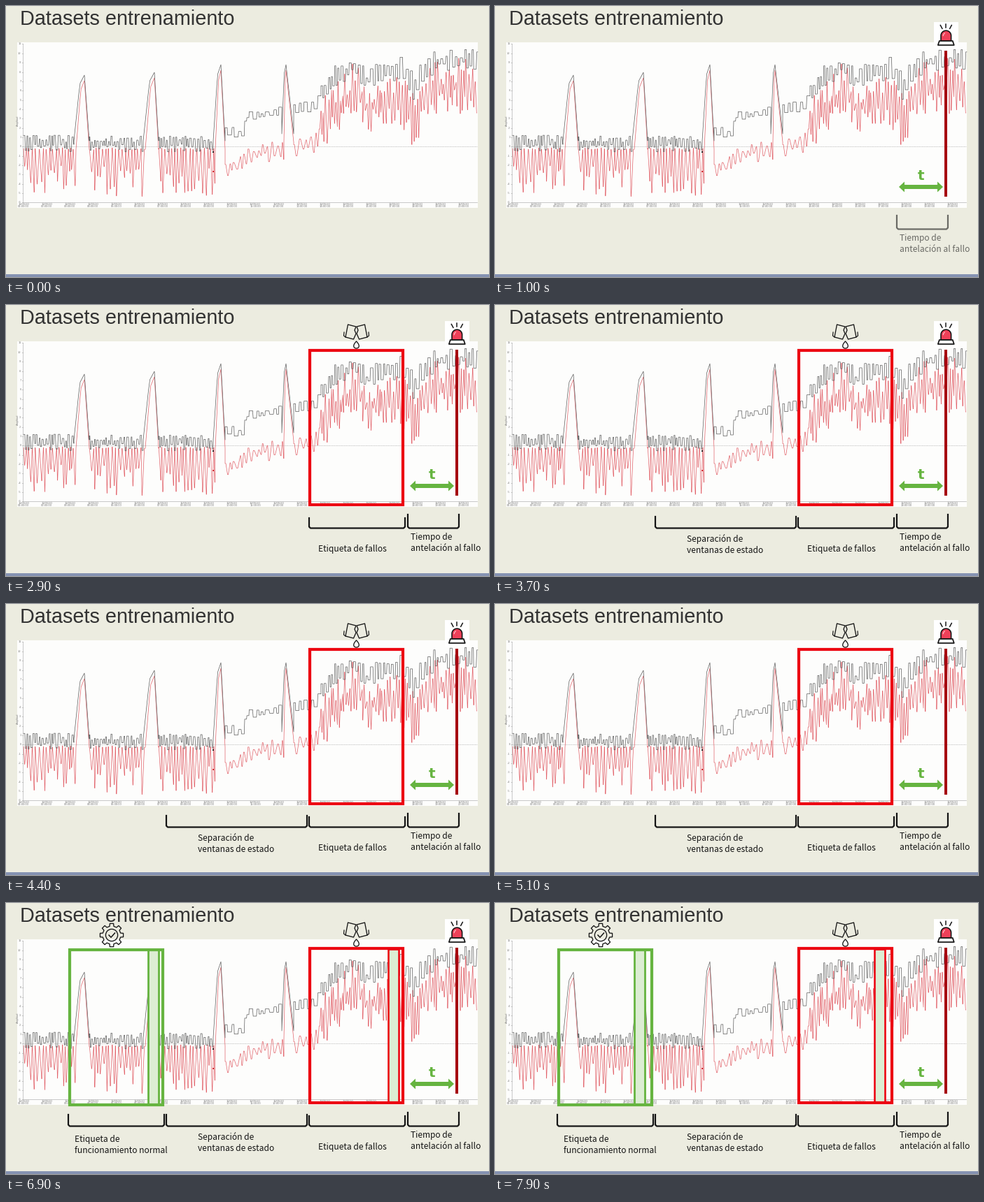
A matplotlib script that plays this animation: 690x388 px, repeating every 8 s.

```python
import numpy as np
import matplotlib.pyplot as plt
from matplotlib.animation import FuncAnimation
from matplotlib.patches import Circle, Polygon, Rectangle
from matplotlib.transforms import Bbox, TransformedBbox

W, H = 690, 388
STEP, FRAMES = 100, 80
PX = 0.72  # points per pixel at 100 dpi

BG, INK = "#ecece0", "#141414"
RED, DARK_RED = "#ec0612", "#a60510"
GREEN, PALE = "#66b440", "#dcedd3"

fig = plt.figure(figsize=(W / 100, H / 100), dpi=100, facecolor=BG)
ax = fig.add_axes([0, 0, 1, 1])
ax.set_xlim(0, W)
ax.set_ylim(H, 0)
ax.axis("off")
rng = np.random.default_rng(11)


# drawing helpers, all in pixel coordinates

def line(pts, color=INK, width=2.0, z=5, **kw):
    x, y = zip(*pts)
    return ax.plot(x, y, color=color, lw=width * PX, zorder=z,
                   solid_joinstyle="round", **kw)[0]


def box(x0, y0, x1, y1, face="none", edge="none", width=0.0, z=5):
    return ax.add_patch(Rectangle((x0, y0), x1 - x0, y1 - y0, fc=face, ec=edge,
                                  lw=width * PX, zorder=z, joinstyle="miter"))


def shape(pts, face="none", edge=INK, width=1.3, z=6):
    return ax.add_patch(Polygon(pts, closed=True, fc=face, ec=edge,
                                lw=width * PX, zorder=z, joinstyle="round"))


def text(x, y, s, size=12, color=INK, font="Noto Sans CJK JP", **kw):
    kw.setdefault("va", "baseline")
    return ax.text(x, y, s, fontsize=size * PX, color=color, family=font,
                   clip_on=True, zorder=7, **kw)


def label(x, y, *rows):
    return [text(x, y + 15.5 * i, s) for i, s in enumerate(rows)]


def bracket(x0, x1, top, bottom=319.5):
    return [line([(x0, top), (x0, bottom - 2), (x0 + 2, bottom),
                  (x1 - 2, bottom), (x1, bottom - 2), (x1, top)], width=2.2)]


def polar(cx, cy, r, deg):
    a = np.radians(deg)
    return cx + r * np.cos(a), cy + r * np.sin(a)


# chart signals

ZERO, UNIT = 201.3, 13.35
LEFT, RIGHT = 25, 674
PEAKS = [(97, 112, 119, 99), (196, 212, 218, 95), (296, 307, 313, 84), (394, 400, 411, 84)]
IDLE_END = 313
KNOTS = [313, 336, 343, 392, 440, 460, 500, 515, 565, 584, 597, 630, 674]
BLACK_Y = [180, 187, 158, 153, 144, 110, 84, 108, 86, 124, 86, 78, 76]
RED_Y = [230, 222, 212, 206, 194, 160, 118, 146, 130, 172, 122, 116, 114]


def wander(x0, x1, gap, level, up, down, flat=0.0, least=0.1):
    """Alternate above and below a level, with flat tops of random width."""
    pts, x, side = [], x0, -1
    while x < x1:
        step = gap * rng.uniform(0.5, 1.5)
        y = level(x) + side * rng.uniform(least, 1) * (up if side < 0 else down)
        pts += [(x, y), (min(x + flat * step, x1), y)]
        x, side = x + step, -side
    return pts


def peak(x0, xt, x1, top, base):
    rise = [(x0 + f * (xt - x0), base + g * (top - base))
            for f, g in ((0, 0), (0.47, 0.72), (0.6, 0.88), (1, 1))]
    return rise + [(x1, base)]


def signal(idle, busy, base, lag, drop):
    """Quiet noise, then a rising trend, interrupted by the tall peaks."""
    pts, x = [], LEFT
    for x0, xt, x1, top in PEAKS:
        pts += (idle if x < IDLE_END else busy)(x, x0 + lag)
        foot = base if x1 <= IDLE_END else base - 10
        pts += peak(x0 + lag, xt, x1, top + drop, foot)
        x = x1
    return pts + busy(x, RIGHT)


def black_trend(x):
    return np.interp(x, KNOTS, BLACK_Y)


def red_trend(x):
    return np.interp(x, KNOTS, RED_Y)


def black_idle(x0, x1):
    return wander(x0, x1, 2.3, lambda x: 196, 11, 13, 0.7)


def black_busy(x0, x1):
    calm = wander(x0, min(x1, 450), 5, black_trend, 10, 6, 0.85)
    return calm + wander(max(x0, 450), x1, 3.2, black_trend, 19, 17, 0.8)


def red_idle(x0, x1):
    return wander(x0, x1, 2.35, lambda x: 207, 4, 70, 0.1, 0.3)


def red_busy(x0, x1):
    calm = wander(x0, min(x1, 450), 3.5, red_trend, 14, 16, 0.3)
    return calm + wander(max(x0, 450), x1, 1.9, red_trend, 42, 42, 0.1)


def draw_slide():
    box(0, 384, W, H, "#8592b2", z=1)
    text(20, 27, "Datasets entrenamiento", 28.85, "#333333", "Liberation Sans")
    box(16, 52, 674, 289, "#fdfdfc", z=1)
    line([(24, 54), (24, 281), (673, 281)], "#b4b4b4", 0.7, z=2)
    line([(24, ZERO), (673, ZERO)], "#c4c4c4", 0.8, z=2, ls=(0, (2, 1)))
    tiny = dict(color="#808080", font="Liberation Sans")
    for v in range(-6, 12):
        y = ZERO - UNIT * v
        line([(22.5, y), (24, y)], "#999999", 0.6, z=2)
        text(21.5, y, str(v), 4, ha="right", va="center", **tiny)
    for i in range(20):
        x = 25 + 33.1 * i
        text(x, 284.6, "11/05/20", 4.2, ha="center", **tiny)
        text(x, 288.4, f"{(1 + i) % 24:02d}:00:00", 4.2, ha="center", **tiny)
    text(16.5, 164, "Amplitud", 4, rotation=90, ha="center", va="center", **tiny)
    line(signal(red_idle, red_busy, 205, 3, 8), "#e2626a", 0.7, z=3)
    line(signal(black_idle, black_busy, 193, 0, 0), "#5c5c5c", 0.7, z=4)
    for y, color in ((208, "#222222"), (236, "#d02028")):
        box(295, y, 297.4, y + 2.4, color)


def draw_alarm(cx=644.3, cy=42.5):
    arc = [polar(cx, cy, 7.3, d) for d in range(180, 361, 10)]
    dome = [(cx - 7.3, 50)] + arc + [(cx + 7.3, 50)]
    base = [(cx - 9.5, 50), (cx + 9.5, 50), (cx + 11.5, 56), (cx - 11.5, 56)]
    rays = [line([polar(cx, cy, r, d) for r in (11.5, 17)], width=1.5, z=7)
            for d in (-118, -90, -62)]
    glint = line([polar(cx, cy, 4, d) for d in (180, 210, 240)], "#ffc0c8", 1.2, 7)
    return [box(627, 23, 662, 61, "white"), shape(dome, "#ee4058", width=1.6),
            shape(base, "#f4f4f4", width=1.7), glint,
            box(642, 64, 646, 272.5, DARK_RED, z=6)] + rays


def draw_span(x0=577, x1=640, y=259):
    """Double-headed arrow with its caption."""
    half = [(0, 0), (8, -7.5), (8, -3)]
    top = [(x0 + a, y + b) for a, b in half] + [(x1 - a, y + b) for a, b in half[::-1]]
    arrow = top + [(x, 2 * y - b) for x, b in top[::-1]]
    caption = text(608.5, 249, "t", 20, GREEN, "DejaVu Sans", weight="bold", ha="center")
    return [shape(arrow, GREEN, "none", 0), caption]


def draw_pipe(cx=500.5):
    piece = [(-12, 28), (-0.5, 31), (-2.5, 36), (-0.5, 41), (-4, 49), (-15.5, 46)]
    flange = [(-17.5, 39), (-18, 44), (-15.5, 46)]
    parts = []
    for side in (1, -1):
        parts.append(shape([(cx + side * x, y) for x, y in piece]))
        parts.append(line([(cx + side * x, y) for x, y in flange], width=1.2))
    th = np.linspace(0, 2 * np.pi, 40)
    drop = zip(cx + 4.9 * np.sin(th) * np.sin(th / 2), 57 - 5 * np.cos(th))
    return parts + [shape(list(drop))]


def draw_gear(cx=151, cy=46):
    teeth = [polar(cx, cy, r, 45 * k + d) for k in range(8)
             for d, r in ((-13, 13), (-9, 16.8), (9, 16.8), (13, 13))]
    ring = ax.add_patch(Circle((cx, cy), 8.6, fc="none", ec=INK, lw=1.3 * PX, zorder=6))
    tick = line([(cx - 4, cy), (cx - 1, cy + 3.2), (cx + 4.5, cy - 3)], width=1.5, z=7)
    return [shape(teeth), ring, tick]


# motion

def ramp(t, start, end):
    return min(max((t - start) / (end - start), 0), 1)


def fade(parts, k):
    for p in parts:
        p.set_alpha(k)
        p.set_visible(k > 0)


def wipe_up(parts, k, top, bottom):
    clip = TransformedBbox(Bbox.from_extents(0, bottom - k * (bottom - top), W, bottom),
                           ax.transData)
    for p in parts:
        p.set_visible(k > 0)
        p.set_clip_box(clip)


draw_slide()
normal_strip = box(209, 66.5, 224, 288.5, PALE, GREEN, 2.8, z=7)
fault_strip = box(552, 65.5, 567, 285.5, PALE, RED, 2.6, z=7)
normal_frame = box(91, 66.5, 224, 288.8, edge=GREEN, width=4.2, z=8)
fault_frame = box(434, 64.8, 567.2, 286.2, edge=RED, width=4.2, z=8)

# parts, start and end in ms
FADES = [
    (draw_alarm() + draw_span(), 0, 600),
    (bracket(574, 647, 300) + label(578, 336, "Tiempo de", "antelación al fallo"), 700, 1200),
]
# parts, start and end in ms, top and bottom in pixels
WIPES = [
    ([fault_frame], 1100, 1600, 60, 291),
    (bracket(433, 570, 305), 1100, 1600, 302, 323),
    (draw_pipe(), 1400, 1900, 25, 63),
    (label(446, 353, "Etiqueta de fallos"), 1400, 1900, 338, 361),
    (bracket(229, 430, 303), 3200, 3700, 300, 323),
    (label(274, 339.5, "Separación de", "ventanas de estado"), 3200, 3700, 325, 362),
    ([normal_frame, normal_strip, fault_strip], 5100, 5500, 62, 293),
    (bracket(89, 226, 303), 5100, 5500, 300, 323),
    (draw_gear(), 5200, 5700, 27, 64),
    (label(98, 342, "Etiqueta de", "funcionamiento normal"), 5200, 5700, 327, 364),
]


def update(i):
    t = i * STEP
    for parts, start, end in FADES:
        fade(parts, ramp(t, start, end))
    for parts, start, end, top, bottom in WIPES:
        wipe_up(parts, ramp(t, start, end), top, bottom)

    # the sliding windows advance two pixels every 400 ms
    shift = 2 * max((t - 5600) // 400, 0)
    normal_strip.set_x(209 - shift)
    fault_strip.set_x(552 - shift)
    return []


anim = FuncAnimation(fig, update, frames=FRAMES, interval=STEP,
                     repeat=True, repeat_delay=0, blit=False)
plt.show()
```
